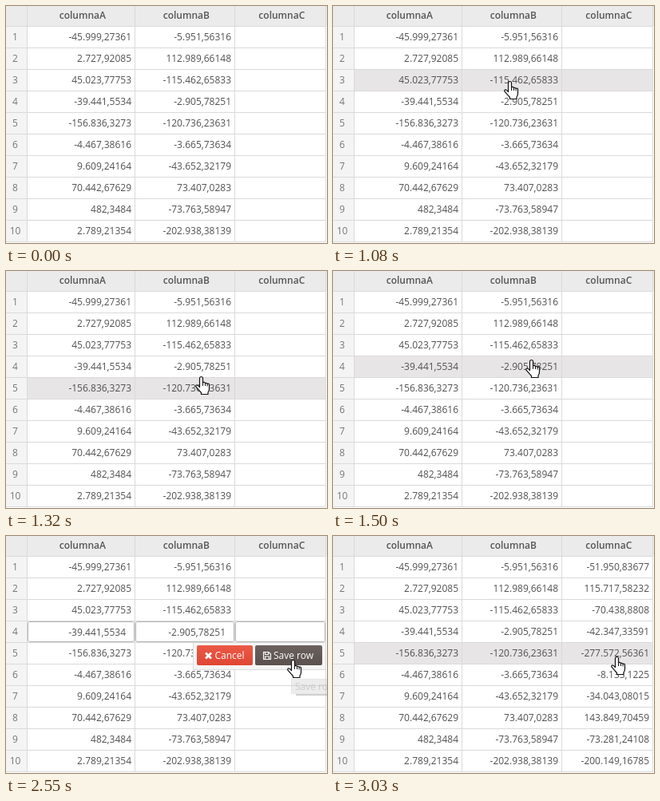
An HTML page with a canvas that plays this animation: 402 by 297 pixels, repeating every 3.84 s.

```html
<!DOCTYPE html>
<html lang="es">
<meta charset="utf-8">
<title>Row editing</title>
<style>
html, body { margin: 0; height: 100%; overflow: hidden; background: #fff }
canvas { display: block }
</style>
<canvas width="402" height="297"></canvas>
<script>
const ctx = document.querySelector('canvas').getContext('2d');
const LOOP = 3840, STEP = 30, ENTER = 810, EDIT = 1800, TIP = 2550, SAVED = 2820;
const EDIT_ROW = 3, ROW_H = 27, TOP = 26;
const FONT = '12px "Open Sans", sans-serif';
const columns = [
  { name: 'columnaA', left: 27, right: 161 },
  { name: 'columnaB', left: 162, right: 286 },
  { name: 'columnaC', left: 287, right: 400 }
];
const rows = [
  ['-45.999,27361', '-5.951,56316', '-51.950,83677'],
  ['2.727,92085', '112.989,66148', '115.717,58232'],
  ['45.023,77753', '-115.462,65833', '-70.438,8808'],
  ['-39.441,5534', '-2.905,78251', '-42.347,33591'],
  ['-156.836,3273', '-120.736,23631', '-277.572,56361'],
  ['-4.467,38616', '-3.665,73634', '-8.133,1225'],
  ['9.609,24164', '-43.652,32179', '-34.043,08015'],
  ['70.442,67629', '73.407,0283', '143.849,70459'],
  ['482,3484', '-73.763,58947', '-73.281,24108'],
  ['2.789,21354', '-202.938,38139', '-200.149,16785']
];
// Pointer path: time, x, y of the fingertip
const path = [
  [810, 387, 62], [960, 20, 84], [1080, 221, 94], [1200, 232, 184],
  [1320, 244, 132], [1410, 247, 102], [1590, 249, 120], [1830, 249, 120],
  [2220, 359, 155], [2970, 359, 155], [3030, 355, 151]
];
const hand = new Path2D('M5.5 13.5V2.5a2 2 0 0 1 4 0V8a1.7 1.7 0 0 1 3 .8a1.6 1.6 0 0 1 2.6 .8' +
  'a1.4 1.4 0 0 1 2.4 1.2V16q0 2-1.5 4V22.5H7.5V20.5Q5 18 1 13.2q-.8-1.6 .6-2.2q1.5-.3 3.9 2.5Z');
const knuckles = new Path2D('M9.5 8V12M12.5 8.8V12M15.1 9.6V12.5');

function pointer(t) {
  if (t <= path[0][0]) return path[0].slice(1);
  const i = path.findIndex(p => p[0] > t);
  if (i < 0) return path[path.length - 1].slice(1);
  const [t0, x0, y0] = path[i - 1], [t1, x1, y1] = path[i];
  const k = (t - t0) / (t1 - t0), e = k * k * (3 - 2 * k);
  return [Math.round(x0 + (x1 - x0) * e), Math.round(y0 + (y1 - y0) * e)];
}

function rect(x, y, w, h, color) {
  ctx.fillStyle = color;
  ctx.fillRect(x, y, w, h);
}

function text(s, x, y, align, color, weight = '') {
  ctx.font = weight + ' ' + FONT;
  ctx.textAlign = align;
  ctx.fillStyle = color;
  ctx.fillText(s, x, y);
}

function outline(shape, color, width) {
  ctx.strokeStyle = color;
  ctx.lineWidth = width;
  ctx.stroke(shape);
}

function roundBox(x, y, w, h, r) {
  const p = new Path2D();
  p.roundRect(x, y, w, h, r);
  return p;
}

function drawTable(hover, editing, saved) {
  rect(0, 0, 402, 297, '#fff');
  rect(0, 26, 26, 270, '#f4f4f4');
  rect(0, 0, 402, 25, '#ebebeb');
  if (hover >= 0) rect(27, TOP + hover * ROW_H, 373, 26, '#e8e5e6');
  for (let i = 0; i <= rows.length; i++) rect(0, 25 + i * ROW_H, 401, 1, '#dadada');
  for (const x of [26, 161, 286, 400]) rect(x, 0, 1, 296, '#dadada');
  for (const c of columns) text(c.name, (c.left + c.right) / 2 + 1.8, 16, 'center', '#555', '600');
  rows.forEach((row, i) => {
    const y = 43 + i * ROW_H, active = editing && i === EDIT_ROW;
    text(i + 1, 11.5, y, 'center', '#777');
    columns.forEach((c, j) => {
      if (active) outline(roundBox(c.left + .5, 107.5, c.right - c.left - 1, 25, 2), '#b4b4b4', 1);
      if (j < 2 || saved)
        text(row[j], c.right - (active ? 11 : 4), y + (active ? 1 : 0), 'right', '#515151');
    });
  });
}

function button(x, w, from, to, label, labelX) {
  const g = ctx.createLinearGradient(0, 137, 0, 162);
  g.addColorStop(0, from);
  g.addColorStop(1, to);
  ctx.fillStyle = g;
  ctx.fill(roundBox(x, 137, w, 25, 2));
  text(label, labelX, 154, 'left', '#fff');
}

function drawPopup(x, y) {
  const over = (a, b) => y >= 137 && x >= a && x < b;
  rect(234, 134, 167, 34, '#d9d9d9');
  rect(235, 134, 165, 33, '#f6f5f5');
  button(239, 70, ...(over(239, 309) ? ['#e4513d', '#d33a28'] : ['#ea5a46', '#df4632']), 'Cancel', 261.5);
  button(312, 84, ...(over(312, 396) ? ['#6b615e', '#5a514f'] : ['#7a706c', '#6c625f']), 'Save row', 335);
  outline(new Path2D('M250 146.5l7 7m0-7l-7 7'), '#fff', 2.8);
  outline(new Path2D('M322.5 145.5h6.5l2.5 2.5v6.500h-9zM324.500 145.500v3h4v-3M324.500 154.500v-3.500h5v3.500'), '#fff', 1.1);
}

function drawTooltip(alpha) {
  ctx.globalAlpha = Math.min(1, alpha + .2);
  rect(363, 198, 39, 2, '#8a8a8a');
  ctx.globalAlpha = alpha;
  rect(357, 179, 45, 19, '#858585');
  rect(358, 180, 44, 17, '#fff');
  text('Save row', 362, 193, 'left', '#575757');
  ctx.globalAlpha = 1;
}

function drawPointer(x, y, beam) {
  ctx.save();
  if (beam) {
    ctx.translate(x, y);
    const bar = new Path2D('M-3.500 -7.500H-1.500L-.5 -6.500L.5 -7.500H2.500M-.5 -6.500V6.500M-3.500 7.500H-1.500L-.5 6.500L.5 7.500H2.500');
    outline(bar, '#fff', 2);
    outline(bar, '#222', 1);
  } else {
    ctx.translate(x - 7, y);
    ctx.lineJoin = 'round';
    ctx.fillStyle = '#fff';
    ctx.fill(hand);
    outline(hand, '#111', 1.2);
    outline(knuckles, '#111', 1);
  }
  ctx.restore();
}

function draw(now) {
  const t = Math.floor(now % LOOP / STEP) * STEP;
  const editing = t >= EDIT && t < SAVED, saved = t >= SAVED;
  const [x, y] = pointer(t);
  // The highlight trails the pointer by one step
  const hover = t < ENTER || editing ? -1 : Math.floor((pointer(t - STEP)[1] - TOP) / ROW_H);
  drawTable(hover, editing, saved);
  if (editing) drawPopup(x, y);
  if (editing && t >= TIP) drawTooltip(.2 + .8 * (t - TIP) / 240);
  if (t >= ENTER) drawPointer(x, y, editing && y < 134);
}

const start = performance.now();
function frame() {
  draw(performance.now() - start);
  requestAnimationFrame(frame);
}
frame();
</script>
</html>
```
